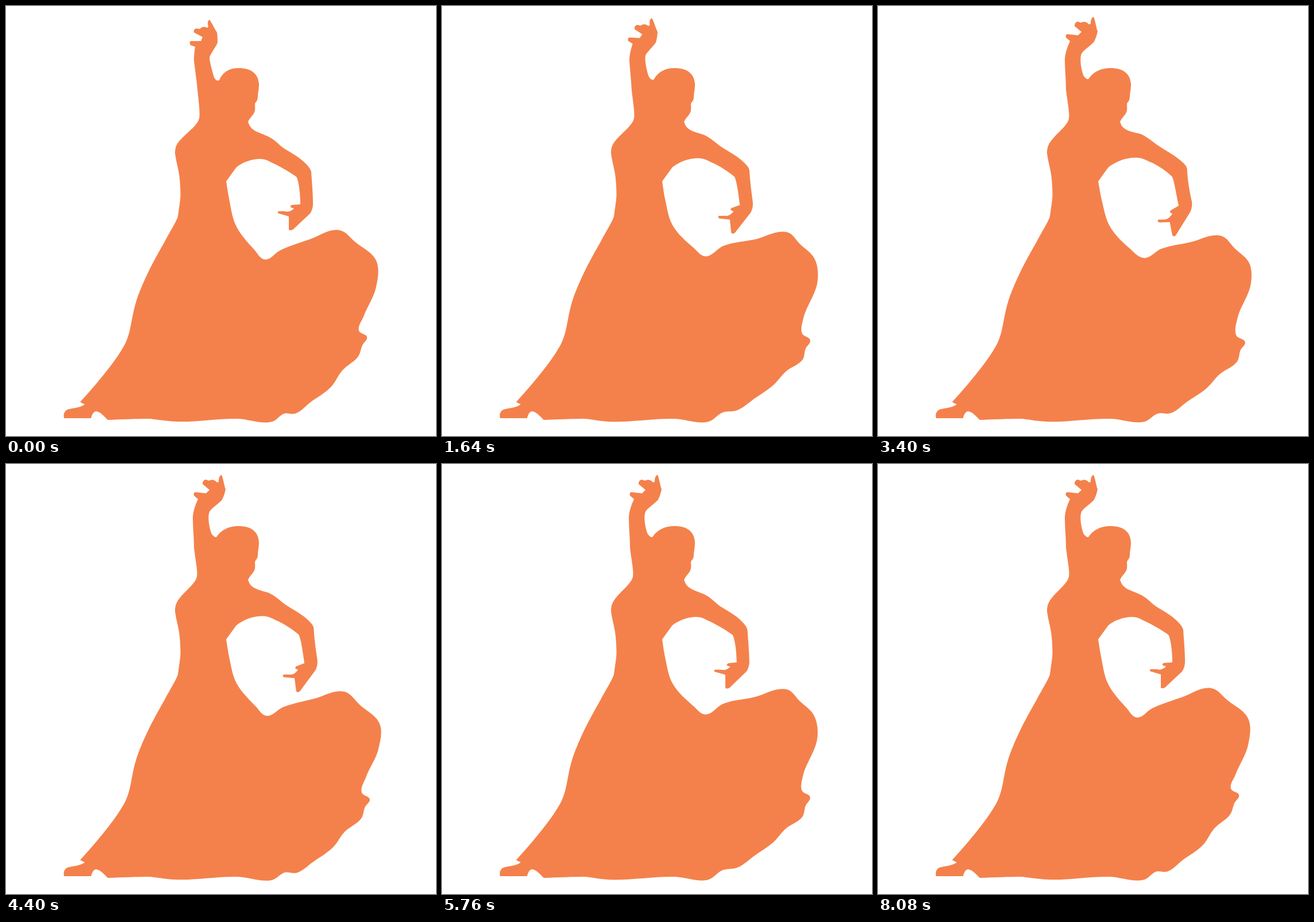
These frames come from a looping animation (748x748 px, 8200 ms). An HTML page:

```html
<!DOCTYPE html>
<html lang="en">
<head>
<meta charset="utf-8">
<title>Dancer</title>
<style>
html, body { margin: 0; width: 100%; height: 100%; overflow: hidden; background: #fff; }
svg { display: block; width: 100vw; height: 100vh; fill: #f4814b; }
</style>
</head>
<body>
<svg viewBox="0 0 748 748">
  <path d="M294 256C296 272 301 286 302 300C304 320 304 340 302 357C300 370 287 389 276 410C262 434 245 465 232 498C217 536 220 560 208 586C194 614 160 655 129 689L137 693C128 700 112 699 105 703C100 707 100 712 101 717L148 717C150 709 153 705 157 705C164 706 170 713 177 720C200 719 230 718 250 718L400 600L375 330L383 305L430 240L421 202C422 196 433 188 433 181C434 175 432 171 434 168C438 164 438 160 438 155C439 148 440 143 440 136C439 118 427 108 404 108L375 150L320 245Z"/>
  <path id="raised"/>
  <path id="bent"/>
  <path id="skirt"/>
</svg>
<script>
const LOOP = 8200, LAST = 8080, STEP = 40, SWIRL = LAST / 2, ARM = 3100;

const raised = [
  "M294 256C294 244 298 238 306 230C318 218 333 207 336 196C338 186 335 165 333 145C331 125 329 112 327 95C327 85 328 78 329 71L321 68C319 65 319 62 322 61L339 61L342 54L327 46C326 42 328 40 331 39L337 40C341 36 344 35 350 38L352 36C350 30 351 25 354 24C358 29 363 40 367 46C368 52 368 60 368 64C364 73 355 84 354 90C354 96 360 118 362 124C364 129 368 131 371 129C377 115 388 108 404 108L410 200L340 290Z",
  "M294 256C294 244 298 238 304 231C314 219 330 207 332 196C334 186 329 165 327 145C327 125 325 112 325 92C326 80 330 70 334 61L327 55C326 52 327 49 330 49L348 51L354 45L342 35C342 31 343 29 347 27L353 29C357 27 362 26 367 32L370 31C370 25 371 20 375 19C378 25 379 36 382 44C381 50 378 58 376 62C370 69 356 78 354 83C350 92 354 114 358 122C361 126 364 128 366 127C375 114 388 108 404 108L410 200L340 290Z"
].map(parse);

const bent = [
  "M383 305C384 296 392 288 400 281C413 271 426 267 440 266C454 266 458 271 468 275C482 282 495 290 505 297C509 303 512 325 512 345L498 346C494 347 494 350 497 351L501 352C497 356 492 359 485 357L475 357C472 357 472 360 475 361L492 366L492 389C493 391 497 390 499 389L529 361C533 355 534 348 534 344C534 325 532 305 531 289C530 284 528 282 525 278C513 264 497 256 484 248C475 242 468 232 454 226C440 220 426 217 422 204L421 202L380 240Z",
  "M383 305C385 296 392 288 400 281C415 270 430 264 448 264C460 264 468 270 476 273C490 280 503 289 511 297C515 305 518 328 522 347L509 354C506 355 506 358 508 359L511 360C507 366 503 370 497 370L487 370C484 371 485 374 488 375L506 375L510 398C511 400 514 400 516 398L542 358C545 352 545 346 545 342C541 322 538 305 537 284C536 279 534 277 530 273C518 261 500 252 488 244C478 237 468 228 457 223C442 219 426 217 422 204L421 202L380 240Z"
].map(parse);

// Hem and edge of the skirt, from the floor round to the armpit
const skirt = [
  [0, "250 718 300 723 402 718 463 723 484 709 503 709 530 689 565 663 585 634 613 609 620 590 628 576 614 565 622 540 644 488 644 443 608 411 580 390 528 406 477 425 450 441 432 424 400 382 388 335 383 305"],
  [940, "250 718 290 723 403 718 463 725 488 714 510 716 543 699 577 675 598 652 630 630 634 611 643 599 629 585 635 555 655 515 663 472 632 437 607 409 550 414 494 418 459 432 440 417 402 378 389 340 383 305"],
  [1880, "250 718 290 723 405 718 463 723 488 706 514 701 545 679 576 657 598 633 627 612 632 594 640 578 626 567 627 543 653 472 646 435 621 410 600 391 542 405 489 417 458 436 438 422 401 382 388 336 383 305"],
  [2980, "250 718 290 723 405 718 464 723 488 709 512 708 543 687 575 666 599 644 631 623 636 603 644 589 628 577 627 545 651 480 647 450 628 428 606 405 549 414 501 421 470 437 438 418 405 384 390 340 383 305"]
].map(([at, text]) => ({ at, pts: text.split(" ").map(Number) }));
skirt.push({ at: SWIRL, pts: skirt[0].pts });

function parse(d) {
  return { ops: d.split(/[-\d. ]+/), nums: d.match(/\d+/g).map(Number) };
}
const lerp = (a, b, k) => a.map((v, i) => v + (b[i] - v) * k);
const ease = k => (1 - Math.cos(Math.PI * k)) / 2;

// Rebuild a path between two poses that share the same commands
function blend([a, b], k) {
  const nums = lerp(a.nums, b.nums, k);
  const ops = a.ops.concat();
  let i = 0;
  return ops.join("").replace(/[MLC]/g, op => {
    const n = op === "C" ? 6 : 2;
    return op + nums.slice(i, i += n).map(v => v.toFixed(2)).join(" ");
  });
}

// Smooth open curve through points, with handles scaled to each span
function smooth(flat) {
  const p = [];
  for (let i = 0; i < flat.length; i += 2) p.push([flat[i], flat[i + 1]]);
  const unit = (a, b) => {
    const x = b[0] - a[0], y = b[1] - a[1], n = Math.hypot(x, y) || 1;
    return [x / n, y / n];
  };
  const dir = p.map((q, i) => {
    const u = unit(p[i - 1] || q, q), v = unit(q, p[i + 1] || q);
    return unit([0, 0], [u[0] + v[0], u[1] + v[1]]);
  });
  let d = "M" + p[0];
  for (let i = 1; i < p.length; i++) {
    const a = p[i - 1], b = p[i], h = Math.hypot(b[0] - a[0], b[1] - a[1]) / 3;
    const c1 = a.map((v, j) => v + dir[i - 1][j] * h);
    const c2 = b.map((v, j) => v - dir[i][j] * h);
    d += "C" + [c1, c2, b].map(q => q.map(v => v.toFixed(2))).join(" ");
  }
  return d;
}

function skirtAt(t) {
  const i = skirt.findIndex(key => key.at > t);
  const a = skirt[i - 1], b = skirt[i];
  return smooth(lerp(a.pts, b.pts, ease((t - a.at) / (b.at - a.at)))) + "L304 330Z";
}

const draw = (id, d) => document.getElementById(id).setAttribute("d", d);
const start = performance.now();

function frame(now) {
  const elapsed = Math.max(0, now - start) % LOOP;
  const t = Math.min(LAST, Math.floor(elapsed / STEP) * STEP);
  draw("raised", blend(raised, Math.min(1, t / ARM)));
  draw("bent", blend(bent, 1.14 * ease(Math.min(2, t / ARM))));
  draw("skirt", skirtAt(t % SWIRL));
  requestAnimationFrame(frame);
}
frame(start);
</script>
</body>
</html>
```
